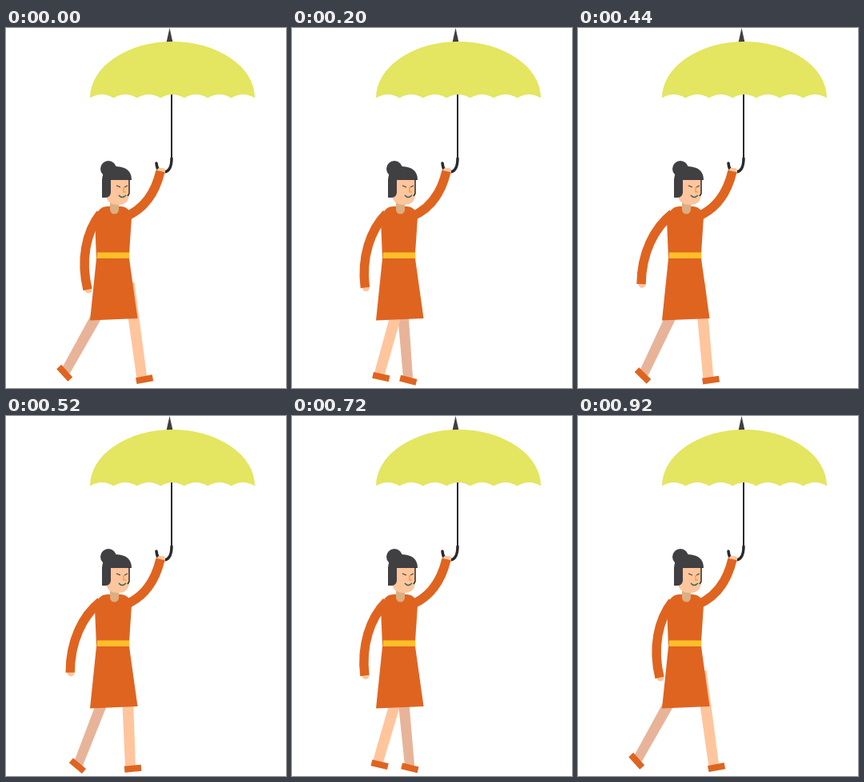
These frames come from a looping animation (350 px wide and 450 px high, 0.96 s). An HTML page:

```html
<!DOCTYPE html>
<html lang="en">
<head>
<meta charset="utf-8">
<title>Walk with umbrella</title>
<style>
  html, body { margin: 0; height: 100%; overflow: hidden; background: #fff; }
  svg { display: block; width: 350px; height: 450px; }
  .dress { fill: #df6420; }
  .skin { fill: #ffc59c; }
  .shade { fill: #e7b499; }
  .dark { fill: #403f42; }
  .gold { fill: #ffbf28; }
  .sleeve { fill: none; stroke: #df6420; stroke-width: 11.5; }
  .line { fill: none; stroke: #2b2b2d; }
</style>
</head>
<body>
<svg viewBox="0 0 350 450">
  <g id="umbrella">
    <path class="dark" d="M204.500 0L208.500 18H200.500Z"/>
    <path class="line" stroke-width="2" d="M207 82V164"/>
    <path class="line" stroke-width="3.5" stroke-linecap="round" d="M207 163C207 176 202 180 197 180C191 180 188.500 175 188 169"/>
    <path id="canopy" fill="#e4e560"/>
  </g>

  <g id="backLeg">
    <path class="shade" d="M4.500 20H18.500L17 122H5Z"/>
    <rect class="dress" x="-10.500" y="-4" width="21" height="8" transform="translate(11 124.600) rotate(19)"/>
  </g>
  <g id="frontLeg">
    <path class="skin" d="M-7 30H7L6.500 150H-6.500Z"/>
    <rect class="dress" x="-10.500" y="-4" width="21" height="8" transform="translate(3 152) rotate(-3)"/>
  </g>

  <g id="backArm">
    <circle class="skin" cx="-15" cy="95" r="4.500"/>
    <path class="sleeve" d="M0 0C-18 23 -25 58 -16 95"/>
  </g>

  <g id="body">
    <rect class="skin" x="189" y="175" width="10" height="8" rx="3"/>
    <path class="sleeve" d="M149 236Q183 222 193 179"/>
    <path class="dress" d="M112 236Q116 223 127 223H144Q155 224 157 237L154 282V288L164.500 363L105 365.500L113 288L111 240Z"/>
    <path class="gold" d="M114 280.500H154L154.500 288H113.500Z"/>
    <path fill="#dcae82" d="M130 218H141V227A5.500 5.500 0 0 1 130 227Z"/>
  </g>

  <g id="head">
    <path class="skin" d="M125 188H154V207Q154 221 140 221Q125 221 125 207Z"/>
    <circle class="dark" cx="128" cy="176" r="10"/>
    <path class="dark" d="M120 212V190Q121 173 138 173Q157 174 157 190H131V206Q130 212 124 212Z"/>
    <path class="line" stroke-width="1.500" d="M154 189V207L152 210"/>
    <path class="line" stroke-width="1" d="M138 197L143 199M148 199L152 197"/>
    <path fill="none" stroke="#ff9c3c" stroke-width="1.500" d="M147 199V205H150"/>
    <path fill="none" stroke="#2c6b58" stroke-width="1.500" d="M141 209Q145 214 150 209"/>
  </g>
</svg>
<script>
const LOOP = 960, STEP = 40, RETURN = 920;
const part = id => document.getElementById(id);

const scallop = 206 / 7;
part("canopy").setAttribute("d",
  "M105 87.5A103 70.5 0 0 1 311 87.5" + `q${-scallop / 2} -9 ${-scallop} 0`.repeat(7) + "Z");

function pose(id, x, y, angle) {
  part(id).setAttribute("transform", `translate(${x} ${y}) rotate(${angle})`);
}

function draw(now) {
  const time = Math.floor(now % LOOP / STEP) * STEP;
  // The walk cycle plays forward, then back slightly faster.
  const k = Math.min(time, 1.04 * (RETURN - time)) / STEP;
  const swing = Math.cos(k * 29.3 * Math.PI / 180);
  pose("backLeg", 124, 317, 10.6 + 18.4 * swing);
  pose("frontLeg", 149.5, 289, 5 - 12.8 * swing);
  pose("backArm", 118, 232, 1.3 * k);
  requestAnimationFrame(draw);
}
draw(performance.now());
</script>
</body>
</html>
```
